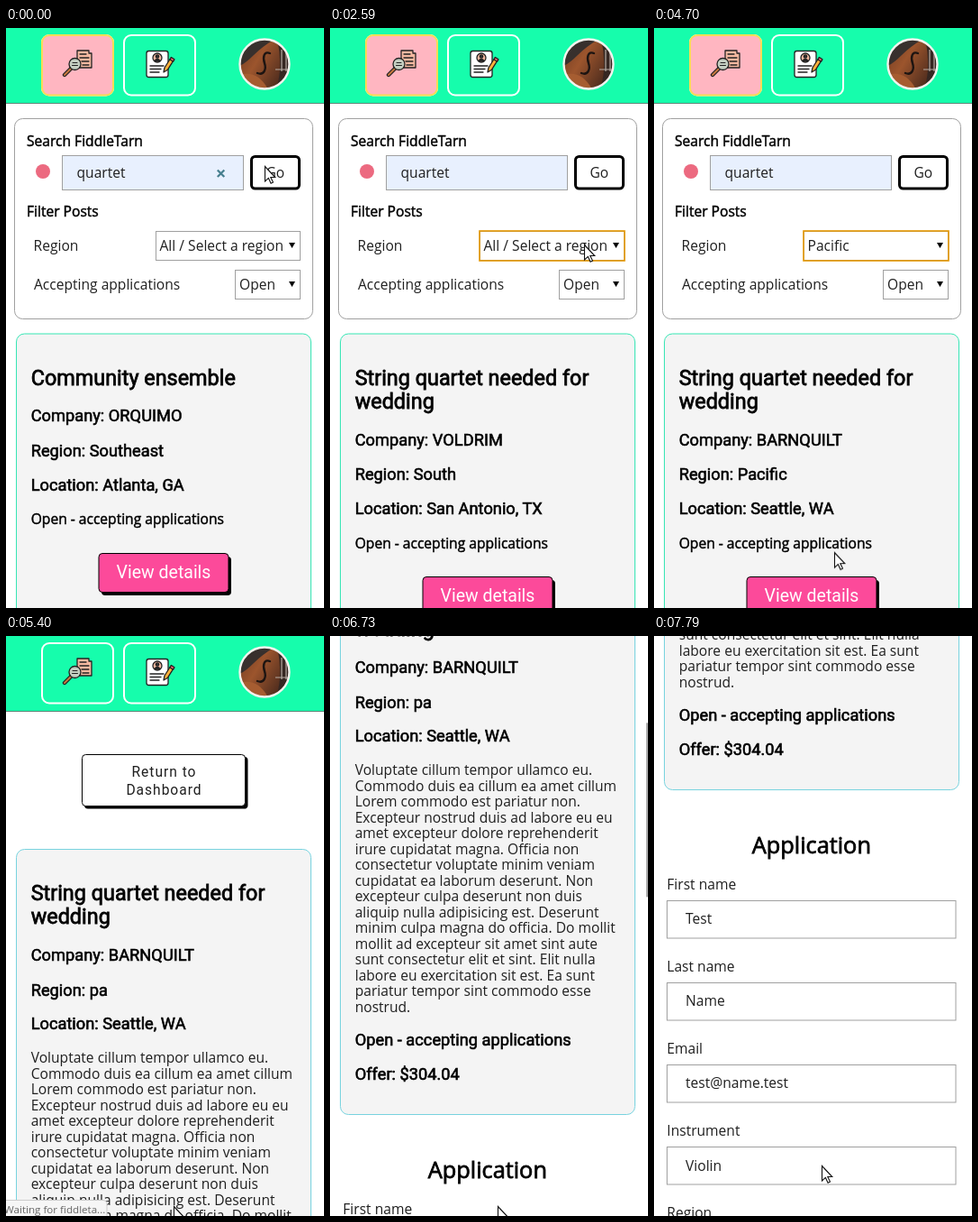
These frames come from a looping animation (353 px wide and 643 px high, 8 s). An HTML page:

```html
<!DOCTYPE html>
<html lang="en">
<head>
<meta charset="utf-8">
<title>Post search</title>
<style>
  html, body { margin: 0; width: 100%; height: 100%; overflow: hidden; background: #fff; }
  svg { display: block; }
  text { font: 15.6px "Open Sans", sans-serif; fill: #1f1f1f; }
  .bold { fill: #000; stroke: #000; stroke-width: .03em; }
  .title, .fact { font-family: Roboto, sans-serif; fill: #000; stroke: #000; stroke-width: .033em; }
  .title { font-size: 23.4px; }
  .fact { font-size: 18.25px; }
  .app { font-size: 25.35px; fill: #000; stroke: #000; stroke-width: .03em; }
  .button { font-family: Roboto, sans-serif; text-anchor: middle; }
  .plain { letter-spacing: .975px; }
  .pink { font-size: 19.5px; fill: #fff; }
  .status { font-size: 11.6px; fill: #666; }
  .box { fill: #fff; stroke: #a0a0a0; }
  .tab { fill: none; stroke: #fff; stroke-width: 2; }
  .ring { fill: none; stroke: #e59700; }
  .ink { stroke: #222; stroke-width: 1.3; stroke-linejoin: round; stroke-linecap: round; }
</style>
</head>
<body>
<svg id="stage" width="353" height="643" viewBox="0 0 353 643">
  <defs>
    <linearGradient id="wood" x1="0" y1="0" x2="1" y2=".6">
      <stop offset="0" stop-color="#6e3b22"/>
      <stop offset=".45" stop-color="#9c552d"/>
      <stop offset="1" stop-color="#4a2a1d"/>
    </linearGradient>
    <clipPath id="round"><circle cx="287" cy="40" r="27"/></clipPath>
  </defs>

  <g id="page">
    <g id="header">
      <rect width="353" height="83.5" fill="#16fdac"/>
      <rect y="83" width="353" height="1" fill="#5c8577"/>
      <rect class="tab" x="40" y="8" width="79" height="66.5" rx="8"/>
      <rect id="active" x="40" y="8" width="79" height="66.5" rx="8" fill="#ffb6c1" stroke="#f6dc55" stroke-width="2"/>
      <rect class="tab" x="131" y="8" width="79" height="66.5" rx="8"/>

      <g class="ink">
        <path d="M79 25h13v3h3v16h-13l-3-3z" fill="#f4b8a0"/>
        <path d="M82 29h7M82 33h10M84 37h8M85 41h7" fill="none"/>
        <path d="M72 45l-7 7" stroke-width="4.4"/>
        <path d="M72 45l-7 7" stroke="#c9793f" stroke-width="2"/>
        <circle cx="76.500" cy="40" r="6.500" fill="#c5cfc2"/>
        <path d="M74 38.500h5M73.500 41.500h6" fill="none" stroke-width="1"/>

        <rect x="156" y="25.500" width="24" height="29" rx="2.500" fill="#fff"/>
        <circle cx="168" cy="33" r="5" fill="#f4b8a0"/>
        <circle cx="168" cy="31.500" r="1.700" fill="#333"/>
        <path d="M165 36.500q3-4 6 0z" fill="#333"/>
        <path d="M160 42h15M160 45.500h12M160 49h10" fill="none"/>
        <path d="M175 49l1-5 7-11 3.500 2.200-7 11z" fill="#ffb13b"/>
        <path d="M182 35l1.500-2.500 3.500 2.200-1.500 2.500z" fill="#ef6570"/>
      </g>

      <g clip-path="url(#round)">
        <rect x="259" y="12" width="56" height="56" fill="url(#wood)"/>
        <path d="M259 12h40q-14 8-24 18t-16 12z" fill="#38302d"/>
        <path d="M259 52q20-6 32 16h-32z" fill="#a65d31"/>
        <path d="M301 12h14v56h-15q8-26 1-56z" fill="#352722"/>
        <path d="M293 28c-7-3-8 5-6 11s0 14-8 11" stroke="#1d1411" stroke-width="2.400" stroke-linecap="round" fill="none"/>
        <path d="M306 24v24M311 24v24M299 46h16" stroke="#b9aea6" stroke-width="1.200" fill="none"/>
      </g>
      <circle cx="287" cy="40" r="27.500" fill="none" stroke="#f3f3ee" stroke-width="2.400"/>
    </g>

    <g id="search">
      <rect class="box" x="9.500" y="100.500" width="331" height="222" rx="9"/>
      <circle cx="41" cy="159" r="8" fill="#ec6a80"/>
      <rect class="box" x="62.500" y="141.500" width="201" height="38" style="fill:#e8f0fe"/>
      <path id="clear" d="M234.800 157.500l7.500 7.500m0-7.500l-7.500 7.500" stroke="#477f8f" stroke-width="2.300"/>
      <rect x="272.500" y="142.500" width="53" height="35.500" rx="4" fill="#fff" stroke="#000" stroke-width="3"/>
      <rect id="goRing" class="ring" x="270.800" y="140.800" width="56.500" height="39" rx="2" stroke-width="1.600"/>
      <rect class="box" x="166.500" y="225.500" width="160" height="32"/>
      <rect id="regionRing" class="ring" x="166" y="225" width="161" height="33" stroke-width="1.600"/>
      <rect class="box" x="254.500" y="268.500" width="72" height="32"/>
      <path d="M314 238h7l-3.500 6zM314 281h7l-3.500 6z"/>
    </g>

    <g id="detail">
      <rect x="87" y="134" width="181.500" height="57.500" rx="4"/>
      <rect x="84.500" y="131.500" width="181" height="57" rx="4" fill="#fff" stroke="#000"/>
      <rect x="11.500" y="236.500" width="327" height="613" rx="9" fill="#f4f4f4" stroke="#78d3df"/>
    </g>
  </g>

  <rect id="thumb" x="351" y="0" width="2" height="193" fill="#000" fill-opacity=".35"/>
  <g id="status">
    <path d="M-2 625.500h110q4 0 4 4v16H-2z" fill="#f6f6f6" stroke="#ccc"/>
  </g>
  <path id="cursor" d="M.5 .5v16.500l3.900-3.600 2.700 5.800 2.400-1.100-2.700-5.600h5z" fill="#fff" stroke="#111" stroke-width="1.100"/>
</svg>

<script>
const LOOP = 8000;
const LEFT = 27.7;
const $ = id => document.getElementById(id);

function add(parent, tag, attrs, content = '') {
  const el = document.createElementNS('http://www.w3.org/2000/svg', tag);
  for (const name in attrs) el.setAttribute(name, attrs[name]);
  el.textContent = content;
  return parent.appendChild(el);
}
const write = (parent, cls, x, y, words) => add(parent, 'text', { class: cls, x, y }, words);

// Rows are [time, value]; each value holds until the next row.
function play(el, prop, rows) {
  const frames = rows.map(([t, v]) => ({ offset: t / LOOP, [prop]: v, easing: 'step-end' }));
  frames.push({ offset: 1, [prop]: rows[rows.length - 1][1] });
  el.animate(frames, { duration: LOOP, iterations: Infinity });
}
function show(el, from, to) {
  const rows = [[0, from ? 0 : 1]];
  if (from) rows.push([from, 1]);
  if (to < LOOP) rows.push([to, 0]);
  play(el, 'opacity', rows);
}

// Search form
const search = $('search');
write(search, 'bold', 23, 130.7, 'Search FiddleTarn');
write(search, 'bold', 23, 208.7, 'Filter Posts');
write(search, '', 78.5, 165.8, 'quartet');
write(search, '', 288.5, 165.8, 'Go');
write(search, '', 30.5, 246.7, 'Region');
write(search, '', 31, 289.7, 'Accepting applications');
write(search, '', 259, 289.7, 'Open');
show(write(search, '', 170.5, 246.7, 'All / Select a region'), 0, 3450);
show(write(search, '', 170.5, 246.7, 'Pacific'), 3450, LOOP);

// Result cards
add(search, 'rect', {
  x: 11.5, y: 339, width: 327, height: 340, rx: 9, fill: '#f4f4f4', stroke: '#36e6b4'
});
function result(from, to, title, company, region, place) {
  const g = add(search, 'g');
  const shift = (title.length - 1) * 26.3;
  title.forEach((line, i) => write(g, 'title', LEFT, 396.3 + i * 26, line));
  [`Company: ${company}`, `Region: ${region}`, `Location: ${place}`]
    .forEach((line, i) => write(g, 'fact', LEFT, 436.3 + shift + i * 38.4, line));
  write(g, 'bold', LEFT, 550.3 + shift, 'Open - accepting applications');
  const y = Math.floor(583 + shift);
  add(g, 'rect', { x: 106, y: y + 3, width: 144, height: 43, rx: 4 });
  add(g, 'rect', { x: 103, y: y - .5, width: 144, height: 43, rx: 4, fill: '#fc4a9a', stroke: '#000' });
  write(g, 'button pink', 175, y + 27, 'View details');
  show(g, from, to);
}
const wedding = ['String quartet needed for', 'wedding'];
result(0, 560, ['Community ensemble'], 'ORQUIMO', 'Southeast', 'Atlanta, GA');
result(560, 3520, wedding, 'VOLDRIM', 'South', 'San Antonio, TX');
result(3520, LOOP, wedding, 'BARNQUILT', 'Pacific', 'Seattle, WA');

// Detail page
const detail = $('detail');
write(detail, 'button plain', 175.5, 155.8, 'Return to');
write(detail, 'button plain', 175.5, 175.8, 'Dashboard');
wedding.forEach((line, i) => write(detail, 'title', LEFT, 293 + i * 26, line));
[
  [360, 'Company: BARNQUILT'], [399, 'Region: pa'], [436, 'Location: Seattle, WA'],
  [773, 'Open - accepting applications'], [811, 'Offer: $304.04']
].forEach(([y, line]) => write(detail, 'fact', LEFT, y, line));
[
  'Voluptate cillum tempor ullamco eu.',
  'Commodo duis ea cillum ea amet cillum',
  'Lorem commodo est pariatur non.',
  'Excepteur nostrud duis ad labore eu eu',
  'amet excepteur dolore reprehenderit',
  'irure cupidatat magna. Officia non',
  'consectetur voluptate minim veniam',
  'cupidatat ea laborum deserunt. Non',
  'excepteur culpa deserunt non duis',
  'aliquip nulla adipisicing est. Deserunt',
  'minim culpa magna do officia. Do mollit',
  'mollit ad excepteur sit amet sint aute',
  'sunt consectetur elit et sint. Elit nulla',
  'labore eu exercitation sit est. Ea sunt',
  'pariatur tempor sint commodo esse',
  'nostrud.'
].forEach((line, i) => write(detail, '', LEFT, Math.round(473.1 + i * 17.5), line));

write(detail, 'app', 108.7, 919.8, 'Application');
[
  ['First name', 'Test'], ['Last name', 'Name'], ['Email', 'test@name.test'],
  ['Instrument', 'Violin'], ['Region', '']
].forEach(([label, value], i) => {
  const y = 959.6 + i * 91.2;
  write(detail, '', 14.3, y, label);
  add(detail, 'rect', { class: 'box', x: 14.5, y: Math.round(y + 11.9) + .5, width: 320.5, height: 41.5 });
  write(detail, '', 35, y + 38.3, value);
});

write($('status'), 'status', -2, 639.5, 'Waiting for fiddleta...');

// Page state
show($('clear'), 0, 500);
show($('goRing'), 500, 2350);
show($('regionRing'), 2350, LOOP);
show($('active'), 0, 5340);
show(search, 0, 5340);
show(detail, 5340, LOOP);
play($('status'), 'opacity', [[0, 0], [5340, 1], [5710, .65], [5780, .3], [5860, 0]]);

// Scrolling
const scroll = [
  [0, 0], [6410, 13], [6490, 80], [6570, 165], [6650, 245], [6730, 319], [6790, 375],
  [6860, 445], [6940, 525], [7020, 597], [7110, 653], [7190, 679]
];
const moved = ratio => scroll.map(([t, y]) => [t, `translate(0px, ${y * ratio}px)`]);
play($('page'), 'transform', moved(-1));
play($('thumb'), 'transform', moved(.302));
play($('thumb'), 'opacity', [[0, 0], [6410, 1], [7560, .65], [7650, .3], [7790, 0]]);

// Cursor: short stepped glides along quadratic curves
const linear = u => u;
const smooth = u => u * u * (3 - 2 * u);
function glide(start, end, count, ease, a, bend, b) {
  return Array.from({ length: count }, (_, i) => {
    const u = ease((i + 1) / count), v = 1 - u;
    const at = k => v * v * a[k] + 2 * u * v * bend[k] + u * u * b[k];
    return [start + (end - start) * i / (count - 1), at(0), at(1)];
  });
}
const track = [
  [0, 287, 153],
  ...glide(1660, 2200, 8, linear, [287, 153], [319, 178], [282, 240]),
  ...glide(2900, 3300, 6, smooth, [282, 240], [273, 270], [262, 298]),
  ...glide(4320, 4850, 8, smooth, [262, 298], [232, 470], [186, 632]),
  [6940, 186, 625], [7020, 186, 612], [7110, 186, 599], [7190, 186, 591],
  [7270, 186, 589], [7370, 186, 587]
];
play($('cursor'), 'transform', track.map(([t, x, y]) => [t, `translate(${x}px, ${y}px)`]));
</script>
</body>
</html>
```
